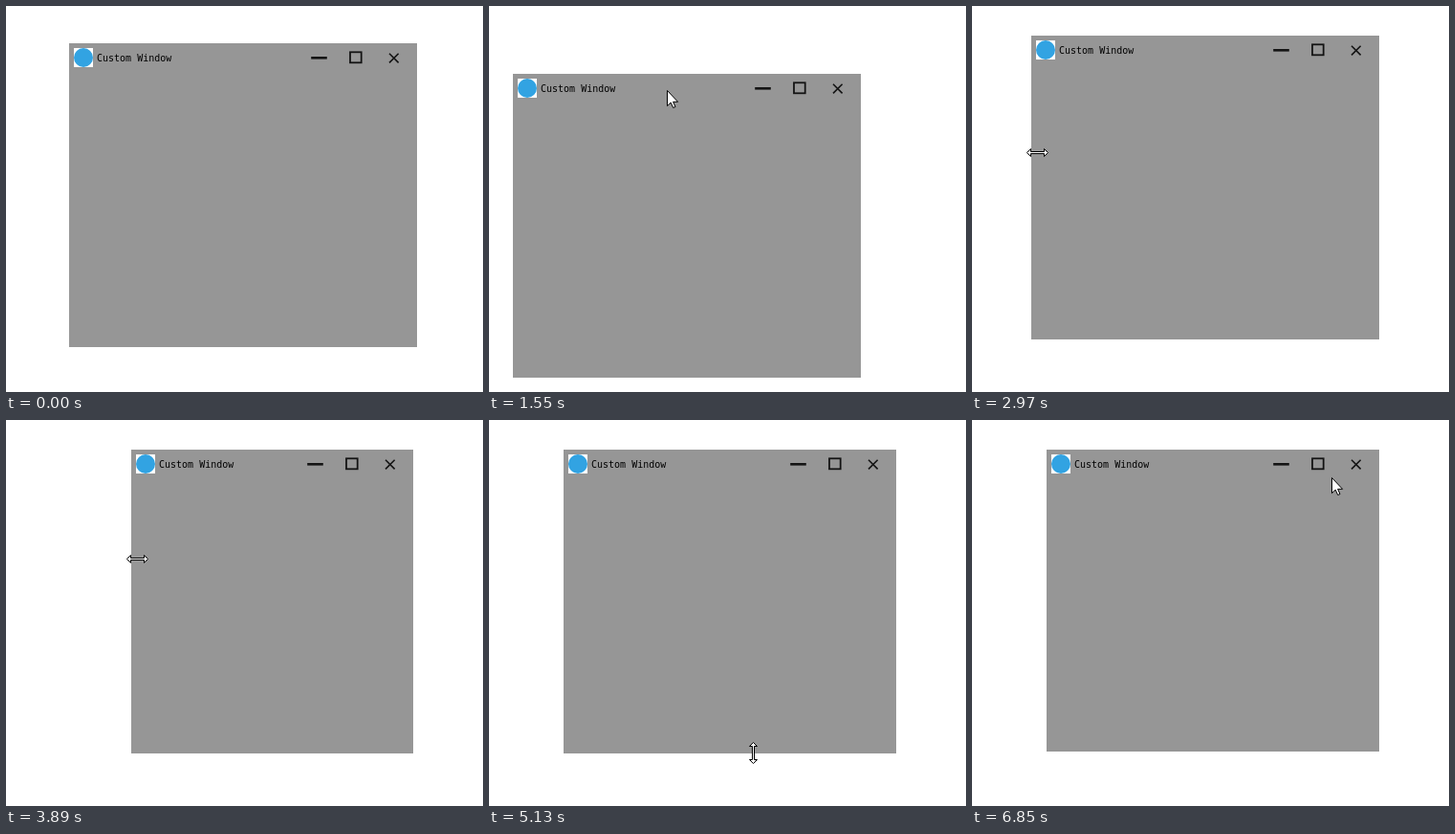
Write an HTML page that moves like this. It is 499x404 px and loops after 6.93 s.

```html
<!DOCTYPE html>
<html lang="en">
<head>
<meta charset="utf-8">
<title>Custom Window</title>
<style>
  html, body { margin: 0; width: 100%; height: 100%; overflow: hidden; background: #fff; }
  #win { position: absolute; left: 0; top: 0; background: #969696; overflow: hidden; }
  #icon { position: absolute; left: 5px; top: 5px; width: 20px; height: 20px; background: #fff; }
  #icon::after { content: ""; position: absolute; inset: 0; border-radius: 50%; background: #32a3e2; }
  #title {
    position: absolute; left: 29px; top: 9px; white-space: pre; color: #000;
    font: 10px/13px "DejaVu Sans Mono", "Liberation Mono", monospace;
  }
  #buttons { position: absolute; right: 0; top: 0; }
  #pointer { position: absolute; left: 0; top: 0; overflow: visible; }
  #pointer path { fill: #fff; stroke: #000; stroke-linejoin: round; }
</style>
</head>
<body>
<div id="win">
  <div id="icon"></div>
  <div id="title">Custom Window</div>
  <svg id="buttons" width="120" height="30" fill="none" stroke="#141414">
    <path d="M9.2 15.3H25.8" stroke-width="2.6"/>
    <rect x="50" y="9.3" width="11.7" height="11" stroke-width="1.8"/>
    <path d="M91 10.8L100.6 20.4M100.6 10.8L91 20.4" stroke-width="1.6"/>
  </svg>
</div>
<svg id="pointer" width="1" height="1"><path id="shape"/></svg>
<script>
const LOOP = 6930, STEP = 78;
const START = { left: 66, top: 39, height: 318, x: 0, y: 0, kind: "none" };

// Each value list is [from, to] or [from, halfway, to]; "last" is the pointer on arrival
const moves = [
  { from: 240, to: 850, kind: "arrow", x: [397, 275, 227], y: [284, 122, 56] },
  // dragging by the title bar
  { from: 1240, to: 1860, left: [66, 25, 48], top: [39, 71, 33], x: [223, 186, 209], y: [58, 88, 50] },
  { from: 2030, to: 2510, left: [48, 27, 63], top: [35, 47, 31], x: [209, 188, 224], y: [52, 64, 48] },
  { from: 2660, to: 2970, last: "ew", left: [62], right: [426], x: [208, 68], y: [60, 153] },
  // resizing by the left edge
  { from: 3430, to: 3580, left: [53, 35], y: [152, 150] },
  { from: 3810, to: 4050, left: [72, 151, 170], y: [146, 144] },
  { from: 4200, to: 4430, left: [152, 82] },
  { from: 4580, to: 5130, kind: "arrow", last: "ns", left: [78], x: [81, 291, 276], y: [145, 240, 348] },
  // resizing by the bottom edge
  { from: 5510, to: 5770, height: [304, 238], x: [276, 278] },
  { from: 5920, to: 6150, height: [256, 316], x: [279, 280] },
  { from: 6380, to: 6850, kind: "arrow", x: [285, 340, 376], y: [334, 195, 60] }
];

const ARROW = "M.5 .5V16.6L4.2 13.1L6.7 18.5L9 17.5L6.6 12.3H11.6Z";
const DOUBLE = "M-10.5 .5L-6.5-3.5V-.5H7.5V-3.5L11.5 .5L7.5 4.5V1.5H-6.5V4.5Z";
const shapes = { none: "", arrow: ARROW, ew: DOUBLE, ns: DOUBLE };

const get = id => document.getElementById(id);
const win = get("win"), pointer = get("pointer"), shape = get("shape");

// Curve through the given one, two or three values
function curve(p, u) {
  if (p.length === 1) return p[0];
  const a = p[0], b = p[p.length - 1];
  const mid = p.length === 3 ? p[1] : (a + b) / 2;
  return Math.round(a * (1 - u) * (1 - 2 * u) + 4 * mid * u * (1 - u) + b * u * (2 * u - 1));
}

function stateAt(t) {
  const s = { ...START };
  for (const m of moves) {
    if (t < m.from) break;
    const length = m.to - m.from, steps = Math.round(length / STEP);
    const u = Math.min(1, Math.floor((t - m.from) * steps / length) / steps);
    for (const key of ["left", "top", "right", "height", "x", "y"]) {
      if (m[key]) s[key] = curve(m[key], u);
    }
    s.kind = (u === 1 && m.last) || m.kind || s.kind;
  }
  // resize pointers stick to the edge they hold
  if (s.kind === "ew") s.x = s.left + 6;
  if (s.kind === "ns") s.y = s.top + s.height - 1;
  return s;
}

function draw() {
  const s = stateAt(performance.now() % LOOP);
  win.style.transform = `translate(${s.left}px, ${s.top}px)`;
  win.style.width = (s.right ? s.right - s.left : 364) + "px";
  win.style.height = s.height + "px";
  pointer.style.transform = `translate(${s.x}px, ${s.y}px)`;
  shape.setAttribute("d", shapes[s.kind]);
  shape.setAttribute("transform", s.kind === "ns" ? "matrix(0 1 1 0 0 0)" : "");
  requestAnimationFrame(draw);
}
draw();
</script>
</body>
</html>
```
